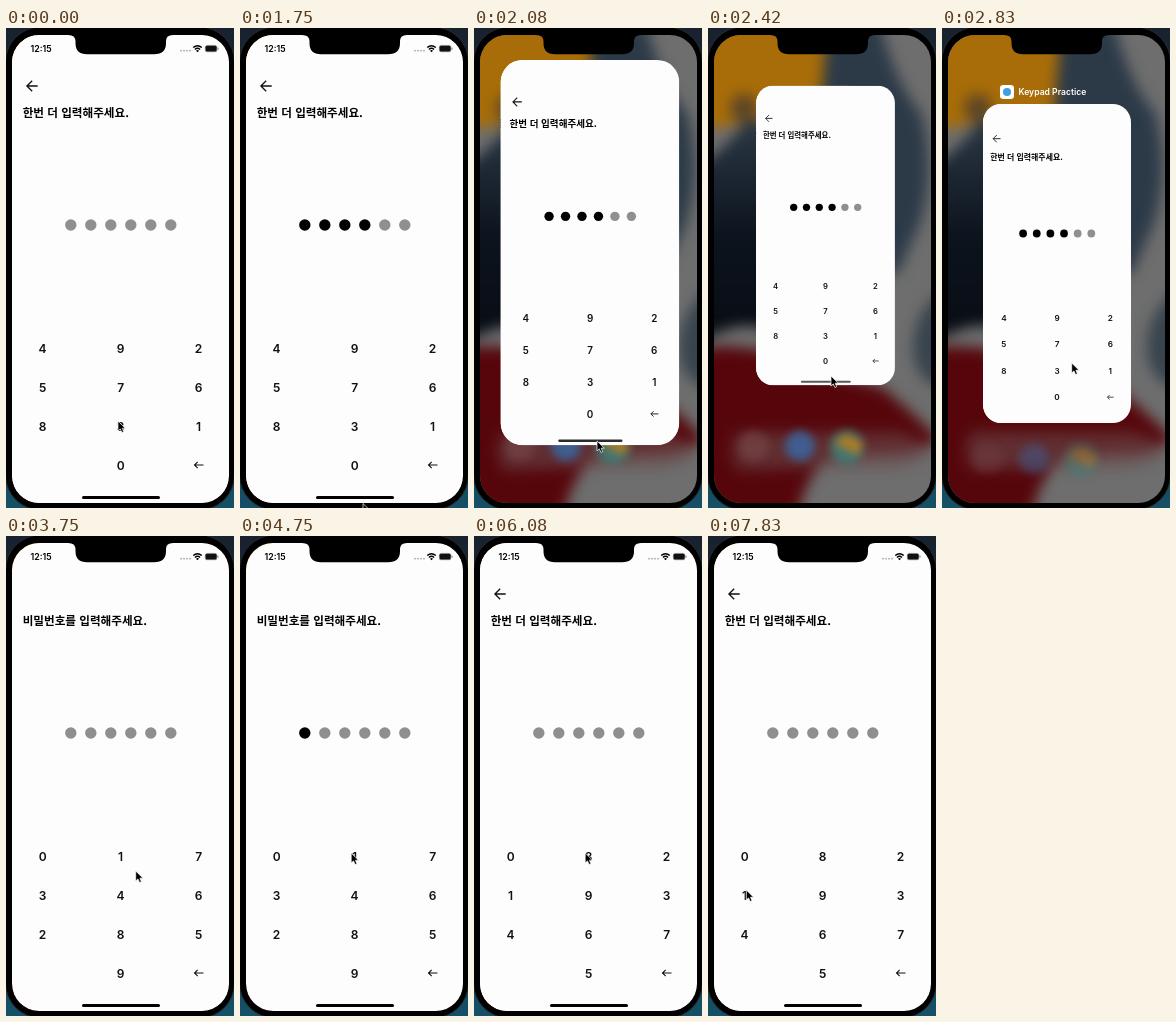
Write an HTML page that moves like this. It is 228x480 px and loops after 8000 ms.

```html
<!DOCTYPE html>
<html lang="ko">
<head>
<meta charset="utf-8">
<title>Passcode keypad</title>
<style>
  html, body { margin: 0; width: 100%; height: 100%; overflow: hidden; background: #000; }
  svg { display: block; width: 100vw; height: 100vh; }
  text { font-family: Inter, "Liberation Sans", sans-serif; font-weight: 600; }
  .title { font: 700 11.6px "Noto Sans CJK KR", "Noto Sans CJK", "Noto Sans CJK JP", sans-serif; }
  .key { font-size: 12px; text-anchor: middle; fill: #111; }
  .line { fill: none; stroke: #111; stroke-width: 1.3; }
</style>
</head>
<body>
<svg viewBox="0 0 228 480" xmlns="http://www.w3.org/2000/svg">
  <defs>
    <clipPath id="screenClip"><rect x="6" y="7" width="217" height="468" rx="27"/></clipPath>
    <filter id="soft" x="-50%" y="-50%" width="200%" height="200%" color-interpolation-filters="sRGB"><feGaussianBlur stdDeviation="7"/></filter>
    <filter id="blob" x="-50%" y="-50%" width="200%" height="200%" color-interpolation-filters="sRGB"><feGaussianBlur stdDeviation="4"/></filter>
    <linearGradient id="desk" x1="0" y1="0" x2="0" y2="1">
      <stop offset="0" stop-color="#18222e"/>
      <stop offset="1" stop-color="#155066"/>
    </linearGradient>
    <linearGradient id="navy" x1="0" y1="0" x2="0" y2="1">
      <stop offset="0" stop-color="#2b3845"/>
      <stop offset=".5" stop-color="#0c131d"/>
      <stop offset="1" stop-color="#080c13"/>
    </linearGradient>
  </defs>
  <rect width="228" height="480" fill="url(#desk)"/>
  <rect x="-.5" y="-1" width="229" height="483" rx="35" fill="#000" stroke="#262b32"/>

  <g clip-path="url(#screenClip)">
    <rect width="228" height="480" fill="#6e6e6e"/>
    <g filter="url(#soft)">
      <path d="M-30-30H122V90H60L10 100-30 95Z" fill="#a86d08"/>
      <ellipse cx="36" cy="80" rx="14" ry="14" fill="#5d4526"/>
      <path d="M122-30H165Q185 55 213 85 228 140 212 195L190 245 120 250 110 110Z" fill="#2c3a48"/>
      <path d="M-30 150Q15 128 38 92L120 100V300H50Q30 290-30 325Z" fill="url(#navy)"/>
      <path d="M250 255Q212 270 206 310 202 340 222 355L250 365Z" fill="#37434d"/>
      <path d="M-30 322Q20 315 50 322L120 345 175 360Q205 385 232 412L200 425 125 428Q95 445 88 500H-30Z" fill="#56060b"/>
      <path d="M30 404H190Q222 412 222 430L190 440H100L30 442Q18 420 30 404Z" fill="#6a4a4b" opacity=".6"/>
    </g>
    <g id="dock" filter="url(#blob)">
      <circle cx="46" cy="418" r="15" fill="#7d4d50" opacity=".6"/>
      <circle cx="92" cy="418" r="15" fill="#3a669f"/>
      <circle cx="139" cy="419" r="17" fill="#3d8078"/>
      <path d="M126 415 138 406 155 415 150 427Z" fill="#c08a20"/>
    </g>
    <g id="label">
      <rect x="58" y="57" width="14" height="14" rx="3.2" fill="#fff"/>
      <circle cx="65" cy="64" r="4" fill="#3f9fdf"/>
      <text x="76.5" y="67.1" font-size="8.6" fill="#fff">Keypad Practice</text>
    </g>
    <g id="card">
      <g clip-path="url(#screenClip)">
        <g id="first"></g>
        <g id="second"></g>
        <g id="status">
          <text x="24.5" y="23.7" font-size="8.8">12:15</text>
          <g fill="#aaa">
            <circle cx="175" cy="22.7" r=".9"/><circle cx="178" cy="22.7" r=".9"/>
            <circle cx="181" cy="22.7" r=".9"/><circle cx="184" cy="22.7" r=".9"/>
          </g>
          <g fill="none" stroke="#000" stroke-width="1.4">
            <path d="M187.2 19.6Q191.5 15.8 195.8 19.6M188.9 21.4Q191.5 19.1 194.1 21.4"/>
          </g>
          <path d="M190 22.7Q191.5 21.4 193 22.7L191.5 24.3Z"/>
          <rect x="199.3" y="17.4" width="11.6" height="6.4" rx="1.9" fill="#111" stroke="#888" stroke-width=".6"/>
          <rect x="211.5" y="19.4" width="1" height="2.4" rx=".5" fill="#777"/>
        </g>
        <rect id="bar" x="76" y="468" width="78" height="3" rx="1.5"/>
      </g>
    </g>
  </g>
  <path d="M62 0V7Q69.500 7 69.500 13V15Q69.500 26.300 81 26.300H148Q160 26.300 160 15V13Q160 7 167 7V0Z"/>
  <path id="cursor" d="M0 0V10L2.300 7.900 3.900 11.500 5.700 10.700 4.200 7.200H7.300Z" stroke="#fff" stroke-width=".7"/>
</svg>
<script>
const LOOP = 8000;
const byId = id => document.getElementById(id);
const clamp = v => Math.min(1, Math.max(0, v));
const span = (t, a, b) => clamp((t - a) / (b - a));
const smooth = p => p * p * (3 - 2 * p);
const easeOut = p => 1 - (1 - p) ** 3;

// Eased interpolation through stops of [time, ...values].
function track(stops, t) {
  const next = stops.findIndex(s => s[0] > t);
  if (next < 0) return stops[stops.length - 1].slice(1);
  if (next === 0) return stops[0].slice(1);
  const a = stops[next - 1], b = stops[next];
  const p = smooth(span(t, a[0], b[0]));
  return a.slice(1).map((v, i) => v + (b[i + 1] - v) * p);
}

const cursorPath = [
  [900, 112, 393], [1250, 123, 475.5], [1750, 123, 475.5], [2420, 123, 348],
  [2520, 123, 348], [2810, 129.7, 335], [3880, 129.7, 335], [4580, 111.2, 317],
  [6630, 111.2, 317], [7170, 39, 354], [7330, 39, 354], [7420, 38.3, 354]
];
// Card centre and scale
const cardPath = [
  [1750, 114.5, 241, 1], [2420, 117.5, 207.5, 0.64], [2500, 117.5, 207.5, 0.64],
  [2810, 115, 235.5, 0.682], [2900, 115, 235.5, 0.682], [3400, 114.5, 241, 1]
];
const labelFade = [[2480, 0], [2780, 1], [2900, 1], [3100, 0]];
const dockFade = [[2420, 0.85], [2800, 0.45]];
const dockDrop = [[2420, 0], [2810, 13]];
const barFade = [[1750, 1], [2420, 0.65], [2700, 0], [2950, 0], [3600, 1]];
const statusFade = [[1750, 1], [2050, 0], [3050, 0], [3450, 1]];

const againTaps = [80, 295, 510, 725];
const firstTaps = [4750, 4960, 5170, 5420, 5580, 5830];
const tapsBy = (taps, t) => taps.filter(tap => tap <= t).length;

function buildPage(id, title, back) {
  let html = '<rect x="6" y="7" width="217" height="468" fill="#fdfdfd"/>';
  html += `<text class="title" x="16.7" y="88.9">${title}</text>`;
  if (back) html += '<path class="line" d="M31.700 58H21M26.200 52.700 20.900 58 26.200 63.300"/>';
  for (let i = 0; i < 6; i++)
    html += `<circle class="dot" cx="${64.8 + 20 * i}" cy="197" r="5.7"/>`;
  for (let i = 0; i < 10; i++) {
    const col = i === 9 ? 1 : i % 3;
    const row = Math.floor(i / 3);
    html += `<text class="key" x="${36.6 + 78 * col}" y="${325.2 + 38.85 * row}"></text>`;
  }
  html += '<path class="line" style="stroke-width:1.1" d="M197.500 437H188.500M191.700 433.800 188.500 437 191.700 440.200"/>';
  const node = byId(id);
  node.innerHTML = html;
  return { node, dots: node.querySelectorAll('.dot'), keys: node.querySelectorAll('.key') };
}

function setPage(page, x, digits, filled) {
  page.node.setAttribute('transform', `translate(${x} 0)`);
  page.dots.forEach((dot, i) => dot.setAttribute('fill', i < filled ? '#000' : '#8f8f8f'));
  page.keys.forEach((key, i) => { key.textContent = digits[i]; });
}

const first = buildPage('first', '비밀번호를 입력해주세요.', false);
const second = buildPage('second', '한번 더 입력해주세요.', true);
const fade = (id, stops, t) => byId(id).setAttribute('opacity', track(stops, t)[0]);

function draw(t) {
  const [cx, cy, scale] = track(cardPath, t);
  byId('card').setAttribute('transform',
    `translate(${cx} ${cy}) scale(${scale}) translate(-114.5 -241)`);
  byId('dock').setAttribute('transform', `translate(0 ${track(dockDrop, t)[0]})`);
  fade('label', labelFade, t);
  fade('dock', dockFade, t);
  fade('status', statusFade, t);
  fade('bar', barFade, t);

  // The confirm page slides away on resume and returns after six digits.
  const away = easeOut(span(t, 3430, 3740)) - easeOut(span(t, 5820, 6080));
  const early = t < 4500;
  setPage(first, -72 * (1 - away), '0173462859', tapsBy(firstTaps, t));
  setPage(second, 218 * away, early ? '4925768310' : '0821934675',
    early ? tapsBy(againTaps, t) : 0);

  const [x, y] = track(cursorPath, t);
  byId('cursor').setAttribute('transform', `translate(${x} ${y})`);
}

const start = performance.now();
function tick() {
  draw((performance.now() - start) % LOOP);
  requestAnimationFrame(tick);
}
tick();
</script>
</body>
</html>
```
